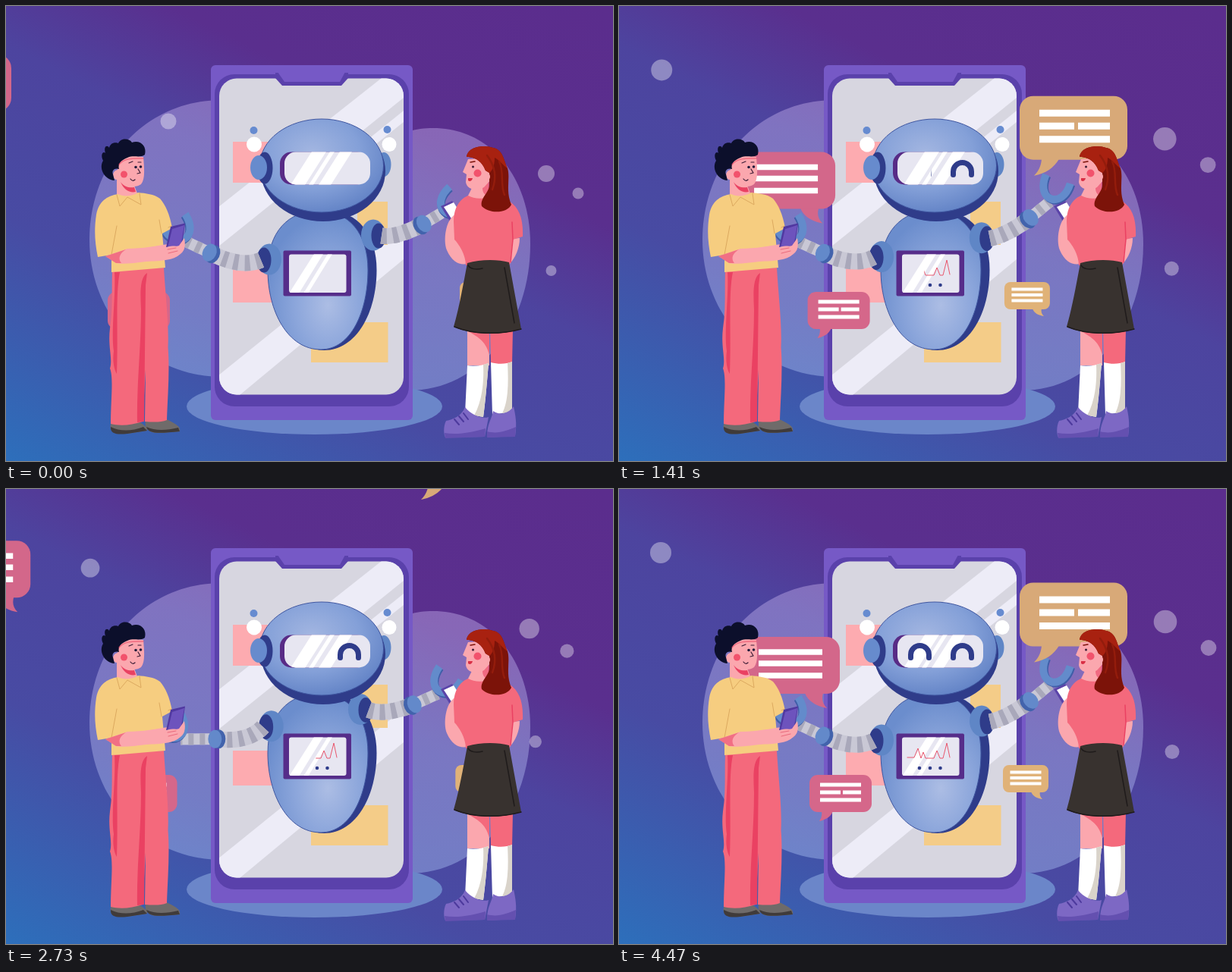
Recreate the animation shown at these times as an HTML page. Size 800 by 600 pixels, loop 4500 ms.

```html
<!DOCTYPE html>
<html lang="en">
<head>
<meta charset="utf-8">
<style>
html, body { margin: 0; width: 100%; height: 100%; overflow: hidden; }
svg { display: block; width: 800px; height: 600px; }
.line { fill: none; stroke-linecap: round; stroke-linejoin: round; }
.skin { fill: #fba7ae; }
.rose { fill: #f4697c; }
.deep { fill: #ea4162; }
.navy { fill: #2f3c8a; }
.blue { fill: #5f86c6; }
</style>
</head>
<body>
<svg viewBox="0 0 800 600">
<defs>
  <linearGradient id="sky" gradientUnits="userSpaceOnUse" x1="0" y1="600" x2="402" y2="-196">
    <stop offset="0" stop-color="#2d6fbb"/><stop offset=".32" stop-color="#484ba3"/>
    <stop offset=".55" stop-color="#4d449f"/><stop offset=".71" stop-color="#5a2f8e"/>
    <stop offset="1" stop-color="#5b2d8d"/>
  </linearGradient>
  <linearGradient id="haze" x1="0" y1="0" x2="0" y2="1">
    <stop offset="0" stop-color="#c0aae8"/><stop offset="1" stop-color="#a4bdf0"/>
  </linearGradient>
  <radialGradient id="headFill" cx=".42" cy=".36" r=".7">
    <stop offset="0" stop-color="#a3b6e1"/><stop offset=".55" stop-color="#84a0d8"/><stop offset="1" stop-color="#5f80c4"/>
  </radialGradient>
  <radialGradient id="bodyFill" cx=".6" cy=".68" r=".65">
    <stop offset="0" stop-color="#acbde4"/><stop offset=".5" stop-color="#8ca6db"/><stop offset="1" stop-color="#6b8dcd"/>
  </radialGradient>
  <clipPath id="screen"><rect x="281" y="95.500" width="243" height="417" rx="23"/></clipPath>
  <clipPath id="visor"><rect x="367" y="192.500" width="113" height="43" rx="15"/></clipPath>
  <clipPath id="panel"><rect x="373" y="327.500" width="75.500" height="50.500" rx="3"/></clipPath>
  <clipPath id="wipe"><path id="wipeShape"/></clipPath>
</defs>

<rect width="800" height="600" fill="url(#sky)"/>
<g fill="url(#haze)" fill-opacity=".45">
  <path d="M285 124C181 124 110 209 110 308C110 410 186 489 285 489Z"/>
  <path d="M530 166C540 162 552 161 563 161C640 161 691 228 691 314C691 420 625 507 530 507Z"/>
</g>
<ellipse cx="406.500" cy="528" rx="168.500" ry="37" fill="#6b86c9"/>
<g id="dots" fill="#fff" fill-opacity=".37"></g>

<!-- phone -->
<rect x="270" y="78" width="266" height="468" rx="6" fill="#7659c6"/>
<rect x="275" y="90" width="256" height="438" rx="26" fill="#5a41ab"/>
<g clip-path="url(#screen)">
  <rect x="280" y="95" width="245" height="420" fill="#d7d6e0"/>
  <path d="M280 265L495 95H524V121L280 317ZM524 138L440 206V220L524 153ZM280 487V513H308L524 334V290Z" fill="#edecf7"/>
</g>
<path d="M355 95L364 105H442L451 95V88H355Z" fill="#5a41ab"/>
<path d="M358 87L367 100H440L447 87Z" fill="#7659c6"/>
<path d="M299 179H353V233H299ZM299 345H353V391H299Z" fill="#fdabb0"/>
<path d="M463 258H503V315H463ZM402 417H503.500V470H402Z" fill="#f4cc88"/>

<!-- robot -->
<path d="M356 348C356 298 388 270 424 270C464 270 488.500 302 488.500 348C488.500 404 462 454 419 454C383 454 356 400 356 348Z" class="navy"/>
<path d="M345 348C345 298 372 270 412 270C452 270 477 300 477 348C477 402 455 453 415 453C371 453 345 402 345 348Z" fill="url(#bodyFill)" stroke="#3f56a0"/>
<rect x="365.500" y="322.500" width="89.500" height="60" rx="2" fill="#562d8a"/>
<g clip-path="url(#panel)">
  <rect x="373" y="327" width="76" height="52" fill="#e7e6f1"/>
  <path d="M406 327H418L386 379H373ZM424 327H430L398 379H392Z" fill="#fff"/>
</g>
<g id="arms"></g>
<ellipse cx="498" cy="209" rx="9.500" ry="16" class="blue"/>
<ellipse cx="418" cy="218" rx="82" ry="66" class="navy"/>
<ellipse cx="416" cy="210.500" rx="81.500" ry="61.500" fill="url(#headFill)" stroke="#3f56a0"/>
<ellipse cx="341" cy="213.500" rx="10.500" ry="21" class="navy"/>
<ellipse cx="333" cy="213" rx="11" ry="16" fill="#678bcd"/>
<rect x="361" y="192.500" width="117" height="43" rx="15" fill="#582b86"/>
<g clip-path="url(#visor)">
  <rect x="366" y="192" width="115" height="45" fill="#e7e6f1"/>
  <path d="M403 192H422L394 236H375ZM427 192H433L405 236H399ZM440 192H456L428 236H412Z" fill="#fff"/>
</g>
<g clip-path="url(#wipe)">
  <path d="M384.500 222.500V218.500A12 12 0 0 1 408.500 218.500V222.500M440.500 222.500V218.500A12 12 0 0 1 464.500 218.500V222.500" class="line" stroke="#2f3c8a" stroke-width="7"/>
  <path d="M380 354H389L394 342L398 355L401 347L404 355H415L419 345L423 355H427L432 335L436 354" class="line" stroke="#e8566d"/>
  <g class="navy"><circle cx="396" cy="368" r="2.300"/><circle cx="410" cy="368" r="2.300"/><circle cx="423.500" cy="368" r="2.300"/></g>
</g>
<g fill="#fff"><circle cx="327" cy="182.500" r="10"/><circle cx="505" cy="182.500" r="9.500"/></g>
<g fill="#668bd0"><circle cx="326.500" cy="164" r="5"/><circle cx="502.500" cy="163" r="5"/></g>

<g id="bubbles"></g>

<!-- man -->
<path d="M139 549C135 559 139 565 160 564L186 560C187 554 176 548 168 545ZM184 547C182 557 188 564 205 563L229 561C232 553 216 548 210 544Z" fill="#6f6b6a"/>
<path d="M138 555C137 566 150 565 160 564L186 560L181 555C165 561 150 561 138 555ZM185 555C187 564 200 564 229 561L227 556C210 560 196 560 185 555Z" fill="#403b3a"/>
<path d="M140 349L208 345C210 380 215 420 213.500 450C216 480 213 515 212 546C205 549 195 549 183 548L184 480L180 548C165 553 150 554 138 551C138 520 142 490 137 478C141 465 134 450 137 425C141 400 139 375 140 349Z" class="rose"/>
<path d="M186 352C176 358 177 380 178 400C178 450 172 500 173 549L182 548L184 368ZM143 351H150C144 380 148 430 146 485C143 480 140 470 142 455C138 430 145 380 143 351Z" class="deep"/>
<path d="M146 222V250C152 256 166 256 173 247L168 234Z" class="skin"/>
<path d="M151 232C156 239 163 240 169 239L171 245C163 247 155 242 151 232Z" class="deep"/>
<path d="M148 248C133 250 122 258 119 275C116 295 117 312 121 331L139 328L139 351L210 345L206 300L219 293C216 275 210 262 203 254C195 248 184 247 174 246C167 251 154 252 148 248Z" fill="#f6cd80"/>
<path d="M146 249L150 264L160 252L178 262L176 247M146 290L139 328M205 300L202 282M214 292L218 290" class="line" stroke="#dca95f"/>
<path d="M131 330L160 320C180 320 200 316 214 314L230 311C238 315 236 322 228 328C222 335 205 336 185 337C168 339 155 341 145 339Z" class="skin"/>
<path d="M131 330L158 321C150 326 147 333 152 339L145 339Z" class="deep" opacity=".55"/>
<path d="M217 291L236 286.500L232 315L211 318Z" fill="#5038a0"/>
<path d="M219 294L235 289L230 318L213 319Z" fill="#6d53bd"/>
<path d="M209 320C216 314 224 318 228 316L235 306C237 316 236 324 227 329C220 334 212 333 209 320Z" class="skin"/>
<path d="M213 321L224 319M214 326L226 323" class="line" stroke="#ea6a7c"/>
<path d="M147 203C158 196 172 198 181 199C182 212 184 228 178 235C170 241 156 237 149 229C140 231 138 218 147 216Z" class="skin"/>
<path d="M143 230C129 229 122 213 128 204C124 196 128 191 131 194C128 184 134 183 136 187C138 179 146 180 148 181C152 173 163 175 166 180C177 176 186 185 183 196C177 201 168 196 160 200C152 203 147 208 149 215C143 213 139 217 141 222Z" fill="#0c0f2b"/>
<path d="M149 209C156 200 170 201 181 201" class="line" stroke="#ea4162" stroke-width="1.500" opacity=".6"/>
<circle cx="155.500" cy="222" r="4.500" fill="#f2526c"/>
<g fill="#201a3a"><circle cx="171" cy="212.500" r="1.800"/><circle cx="177.500" cy="212" r="1.800"/></g>
<path d="M162 207L167 205M174 206L178 206M174 215L177 220L173 221M164 228Q167 232 170 229" class="line" stroke="#3a1c35" stroke-width="1.200"/>

<!-- woman -->
<path d="M573 264L588 257L600 275L588 289Z" fill="#5b44a8"/>
<path d="M577 265L590 259L600 275L590 285Z" fill="#fff"/>
<path d="M608 428H637V474H608Z" class="skin"/>
<path d="M608 428C620 436 632 440 637 460V428ZM638 426H668L667 472H639Z" class="rose"/>
<path d="M608 474C616 476 628 474 636 471C634 495 632 520 629 542L605 537ZM639 470C650 473 660 472 667 469V535L641 539Z" fill="#fff"/>
<path d="M636 471C634 495 632 520 629 542L617 540C628 520 630 495 629 473ZM667 469V535L654 537C663 520 662 490 661 471Z" fill="#d9d3ca"/>
<path d="M605 529C600 541 590 545 580 547C576 555 577 565 579 569L631 568L636 542C628 545 614 540 605 529ZM642 534C640 546 634 550 634 569L671 567C674 550 671 538 669 528C662 538 650 540 642 534Z" fill="#7d68c4"/>
<path d="M578 563C596 566 614 562 632 557L631 568L579 570ZM634 561C648 565 660 560 672 555L671 568L634 569Z" fill="#6450b0"/>
<path d="M591 545L597 552M597 541L603 548M603 537L609 545" class="line" stroke="#4d3a9d" stroke-width="2"/>
<path d="M592 275C579 282 576 310 581 322C588 338 598 342 608 340L608 326C598 322 594 305 594 288ZM666 307L677 306C677 320 671 332 664 340Z" class="skin"/>
<path d="M615 238L636 222V260L606 256Z" class="skin"/>
<path d="M628 240L637 230V252C631 250 628 246 628 240Z" class="deep" opacity=".6"/>
<path d="M609 250C597 255 590 267 590 284L591 308C597 314 606 328 606 342L664 341L668 308L681 304C682 280 676 266 664 258L636 252C626 255 616 254 609 250Z" class="rose"/>
<path d="M667 285L668 308L665 338" class="line" stroke="#ea4162" stroke-width="1.500"/>
<path d="M608 339C625 334 648 334 663 338L679 426C650 435 615 434 590 423C598 395 603 365 608 339Z" fill="#38322f"/>
<path d="M609 342C612 347 620 348 628 346M591 423C615 433 650 434 679 426M657 345L670 418" class="line" stroke="#1f1b1b" stroke-width="1.500"/>
<path d="M609 202L602 219L607 222L606 232C607 242 620 245 630 239L640 228V200Z" class="skin"/>
<path d="M607 199C609 184 632 183 642 187C655 189 656 204 661 214C665 227 658 243 666 262C661 273 638 275 627 264C624 254 637 246 637 236L637 220L632 217C629 209 622 199 607 199Z" fill="#7c1309"/>
<path d="M607 199C609 184 632 183 642 187C655 189 656 204 661 214C656 211 650 203 644 200C644 212 640 218 637 220L632 217C629 209 622 199 607 199Z" fill="#a82110"/>
<path d="M634 197C644 210 647 226 641 242M650 205C657 219 651 235 657 249" class="line" stroke="#931c0c" stroke-width="2.500"/>
<ellipse cx="634" cy="225" rx="4" ry="5" class="skin"/>
<circle cx="621.500" cy="220.500" r="5" fill="#f2526c"/>
<circle cx="615.500" cy="212" r="1.500" fill="#3a1c35"/>
<path d="M612 206L618 205" class="line" stroke="#7c1309" stroke-width="1.500"/>
<path d="M609 227H615C614 231 611 232 609 230Z" fill="#d92f45"/>
</svg>

<script>
const $ = id => document.getElementById(id);
const SWING = [0, 1380, 2850, 4470];
const LOOP = 4500, STEP = 30;

// Linear interpolation of number lists between key times.
function tween(t, times, values) {
  let i = 0;
  while (i < times.length - 2 && t >= times[i + 1]) i++;
  const u = Math.min(1, (t - times[i]) / (times[i + 1] - times[i]));
  return values[i].map((v, k) => v + (values[i + 1][k] - v) * u);
}
const swing = (t, start, near, far) => tween(t, SWING, [start, near, far, near]);

const dots = [
  [[214, 152, 10.5], [55, 84, 14], [116, 106, 12.2]],
  [[712, 221, 11], [720, 175, 15.3], [687, 185, 13]],
  [[754, 247, 7.5], [777, 209.5, 10.4], [736, 214, 9]],
  [[718.5, 349, 7], [729, 346.5, 9.5], [695, 332, 8]]
];

// Shoulder, bend, elbow, hand and hand angle.
const arms = [
  { side: -1, keys: [[347, 334, 310, 346, 270, 326, 229, 296, -30], [346, 331, 310, 345, 270, 326, 229, 296, -30], [350, 311, 320, 334, 278, 330, 221, 317, -30]] },
  { side: 1, keys: [[484, 302, 515, 306, 549, 288, 586, 261, 45], [478, 306, 512, 302, 541, 280, 573.5, 242, 20], [466, 289, 498, 299, 536, 285, 578, 257, 33]] }
];

// Box, corner radius, tail and text bars; tail and bars are relative to the box corner.
const bubbles = [
  { w: 128, h: 75, r: 18, fill: '#d3678a', tail: 'M82 74C86 85 98 92 111 94C105 88 104 82 106 74Z',
    bars: 'M21 20H105M21 35H105M21 51H105', bar: 7.5, keys: [[0], [1], [0]] },
  { w: 82, h: 49, r: 11, fill: '#d5678a', tail: 'M16 48C17 54 15 58 13 61C22 59 28 55 31 48Z',
    bars: 'M14 13H68M14 23H41M44 23H68M14 33H68', bar: 5, keys: [[134, 377], [251, 377], [134, 377]] },
  { w: 142, h: 84, r: 18, fill: '#d8a978', tail: 'M29 83C28 94 24 100 19 105C34 102 45 95 52 83Z',
    bars: 'M26 22.500H119M26 39.500H72M77 39.500H119M26 57H119', bar: 9, keys: [[528, -109], [528, 123.5], [528, -110]] },
  { w: 60, h: 36, r: 8, fill: '#e0b278', tail: 'M37 35C39 41 45 44 52 45C49 42 48 39 49 35Z',
    bars: 'M9.500 9.500H50.500M9.500 17H50.500M9.500 24.500H50.500', bar: 3.8, keys: [[598, 364], [506, 364], [600, 364]] }
];

const route = document.createElementNS('http://www.w3.org/2000/svg', 'path');
route.setAttribute('d', 'M-121 64C-58 66 60 153 163 195');
const routeLength = route.getTotalLength();

$('bubbles').innerHTML = bubbles.map(b => `<g>
  <rect width="${b.w}" height="${b.h}" rx="${b.r}" fill="${b.fill}"/><path d="${b.tail}" fill="${b.fill}"/>
  <path d="${b.bars}" stroke="#fff" stroke-width="${b.bar}"/></g>`).join('');

const tube = (d, width) =>
  `<path d="${d}" fill="none" stroke="#c9c8d5" stroke-width="${width}"/>
   <path d="${d}" fill="none" stroke="#a9a8ba" stroke-width="${width}" stroke-dasharray="7 8"/>`;

function drawArm({ side, keys }, t) {
  const [sx, sy, bx, by, ex, ey, hx, hy, angle] = swing(t, ...keys);
  const a = angle * Math.PI / 180;
  const px = hx - 17 * Math.sin(a), py = hy + 17 * Math.cos(a);
  const tilt = Math.atan2(py - ey, px - ex) * 180 / Math.PI;
  const claw = 'M-17 -15C-19 22 19 22 17 -15';
  return `${tube(`M${ex} ${ey}L${px} ${py}`, 15)}
    <g transform="translate(${hx} ${hy}) rotate(${angle})" fill="none" stroke-width="10">
      <path d="${claw}" stroke="#3f5ea8" transform="translate(${side * 2} 1)"/><path d="${claw}" stroke="#638bcb"/></g>
    <ellipse cx="${sx}" cy="${sy}" rx="16" ry="20.500" class="blue"/>
    <ellipse cx="${sx + side * 7}" cy="${sy + 1}" rx="9.500" ry="16.500" class="navy"/>
    ${tube(`M${sx + side * 11} ${sy + 1}Q${bx} ${by} ${ex} ${ey}`, 21)}
    <g transform="translate(${ex} ${ey}) rotate(${tilt})">
      <ellipse cx="-3" rx="9" ry="12.500" fill="#4263ac"/><ellipse cx="2" rx="9" ry="12" fill="#6389ca"/></g>`;
}

function draw(t) {
  $('dots').innerHTML = dots.map(keys => {
    const [x, y, r] = swing(t, ...keys);
    return `<circle cx="${x}" cy="${y}" r="${r}"/>`;
  }).join('');
  $('arms').innerHTML = arms.map(arm => drawArm(arm, t)).join('');
  bubbles.forEach((b, i) => {
    let [x, y] = swing(t, ...b.keys);
    if (i === 0) ({ x, y } = route.getPointAtLength(x * routeLength));
    $('bubbles').children[i].setAttribute('transform', `translate(${x} ${y})`);
  });
  const [edge] = tween(t, [0, 900, 960, 2110, 3250, LOOP], [[480], [372], [372], [471], [372], [372]]);
  $('wipeShape').setAttribute('d', `M${edge + 3} 190L${edge - 11} 385H500V190Z`);
}

function tick() {
  draw(Math.floor(performance.now() % LOOP / STEP) * STEP);
  requestAnimationFrame(tick);
}
tick();
</script>
</body>
</html>
```
